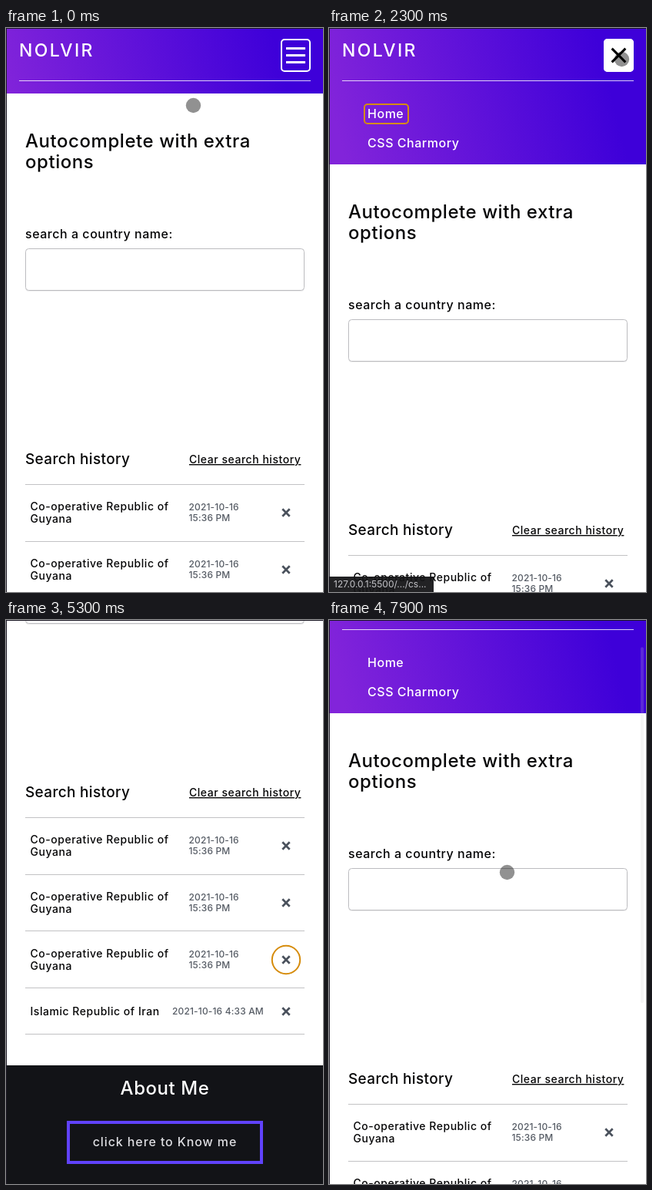
Recreate the animation shown at these times as an HTML page. Size 412x732 px, loop 8000 ms.

```html
<!DOCTYPE html>
<html lang="en">
<head>
<meta charset="utf-8">
<style>
  html, body { margin: 0; height: 100%; overflow: hidden; background: #fff; }
  svg { display: block; width: 412px; height: 732px; }
  text { font: 500 14px Inter, "Open Sans", sans-serif; letter-spacing: .038em; fill: #050506; white-space: pre; }
  .big { font-size: 24px; letter-spacing: .023em; }
  .logo { font-size: 23px; letter-spacing: 2.3px; }
  .mid { font-size: 16px; letter-spacing: .033em; }
  .sub { font-size: 19px; letter-spacing: .017em; }
  .date { font-size: 12px; letter-spacing: .012em; fill: #555b64; }
  .call { font-size: 16px; letter-spacing: .9px; fill: #dedee2; }
  .status { font-size: 12px; font-weight: 400; letter-spacing: 0; fill: #c4c4c8; }
  .link { text-decoration: underline; text-underline-offset: 2px; }
  .light { fill: #fff; }
  .center { text-anchor: middle; }
  .rule { stroke: #c2c2c4; }
  .cross { stroke: #4a515c; stroke-width: 2.7; }
  .focus { fill: none; stroke: #d68c0c; stroke-width: 2; }
</style>
</head>
<body>
<svg viewBox="0 0 412 732">
  <defs>
    <linearGradient id="violet" gradientUnits="userSpaceOnUse" x1="10" y1="130" x2="355" y2="40">
      <stop stop-color="#8224da"/><stop offset="1" stop-color="#3e00d9"/>
    </linearGradient>
  </defs>
  <g id="page">
    <rect id="header" width="412" fill="url(#violet)"/>
    <text class="logo light" x="17" y="37">NOLVIR</text>
    <path d="M17 68.5H396" stroke="#fff" stroke-opacity=".8"/>
    <rect x="358" y="15" width="37" height="41" rx="4" fill="none" stroke="#fff" stroke-width="2"/>
    <rect id="button" x="357" y="14" width="39" height="43" rx="5"/>
    <g id="bars" stroke-width="3"></g>
    <g id="menu">
      <text class="mid light" x="50" y="117">Home</text>
      <text class="mid light" x="50" y="155">CSS Charmory</text>
    </g>
    <g id="main"></g>
  </g>
  <rect id="thumb" x="405" width="4" rx="2" height="462" fill="#ccc" fill-opacity=".2"/>
  <g id="status">
    <rect y="712" width="136" height="20" fill="#151517" fill-opacity=".94"/>
    <text class="status" x="6" y="726">127.0.0.1:5500/.../cs...</text>
  </g>
  <circle id="pointer" r="9.7" fill="#000" fill-opacity=".43"/>
  <path d="M0 .5H412M.5 0V732" stroke="#1d1a26"/>
</svg>
<script>
const $ = id => document.getElementById(id);
const set = (el, attrs) => { for (const k in attrs) el.setAttribute(k, attrs[k]); };
const show = (el, on) => { el.style.display = on ? '' : 'none'; };
const text = (x, y, s, cls = '') => `<text class="${cls}" x="${x}" y="${y}">${s}</text>`;
const rule = y => `<path class="rule" d="M25 ${y}H388"/>`;
const box = (x, y, w, h, r, extra) => `<rect x="${x}" y="${y}" width="${w}" height="${h}" rx="${r}" ${extra}/>`;
const cross = y => `<path class="cross" d="M359.3 ${y - 4.7}l9.4 9.4m0-9.4l-9.4 9.4"/>`;

const MENU = 92, BOTTOM = 428;
const rowY = [629, 703, 777, 844];

let html =
  text(25, 155, 'Autocomplete with extra', 'big') + text(25, 182, 'options', 'big') +
  text(25, 273, 'search a country name:', 'mid') +
  box(25.5, 288, 362, 54, 4, 'fill="#eee"') +
  box(25.5, 286.5, 362, 54, 4, 'fill="#fff" stroke="#bcbcc0"') +
  text(25, 566, 'Search history', 'sub') + text(238, 565, 'Clear search history', 'link') +
  [592.5, 666.5, 739.5, 813.5, 873.5].map(rule).join('');
rowY.forEach((y, i) => {
  html += i < 3
    ? text(31.5, y - 3, 'Co-operative Republic of') + text(31.5, y + 13, 'Guyana') +
      text(237.5, y - 3, '2021-10-16', 'date') + text(237.5, y + 11, '15:36 PM', 'date')
    : text(31.5, y + 5, 'Islamic Republic of Iran') + text(216, y + 4, '2021-10-16 4:33 AM', 'date');
  html += cross(y);
});
html += box(0, 914, 412, 400, 0, 'fill="#121317"') +
  text(206.5, 952, 'About Me', 'big light center') +
  box(81, 988, 251, 52, 0, 'fill="none" stroke="#6042fb" stroke-width="4"') +
  text(206.5, 1019, 'click here to Know me', 'call center');

// Keyboard focus rings, each shown from `from` to `to`
const rings = [];
const ring = (from, to, shape) => {
  rings.push({ from, to });
  return `<g class="ring">${shape}</g>`;
};
const rowRing = (from, to, i) => ring(from, to, `<circle class="focus" cx="364" cy="${rowY[i]}" r="18.2"/>`);
$('menu').innerHTML +=
  ring(2000, 2500, box(46, 99, 57, 25, 4, 'class="focus"')) +
  ring(2500, 3000, box(46, 137, 115, 25, 4, 'class="focus"'));
html +=
  ring(3000, 3700, box(26, 287, 361, 53, 4, 'class="focus"') +
    '<path id="caret" d="M36.5 301V326" stroke="#000"/>') +
  ring(3700, 4300, box(234, 548, 152, 24, 4, 'class="focus"')) +
  rowRing(4300, 4600, 0) + rowRing(4600, 4900, 1) + rowRing(4900, 5500, 2) + rowRing(5500, 6000, 3);
$('main').innerHTML = html;
$('bars').innerHTML = '<path d="M-12.5 0H12.5"/>'.repeat(3);
const ringEls = document.querySelectorAll('.ring');

const within = (t, a, b) => t >= a && t < b;
const clamp = x => Math.min(1, Math.max(0, x));
const mix = (a, b, p) => a + (b - a) * p;
const smooth = p => p * p * (3 - 2 * p);

// Eased path through [time, ...values] points
function along(points, t) {
  let i = 0;
  while (i < points.length - 2 && t >= points[i + 1][0]) i++;
  const [a, b] = [points[i], points[i + 1]];
  const p = smooth(clamp((t - a[0]) / (b[0] - a[0])));
  return a.slice(1).map((v, k) => mix(v, b[k + 1], p));
}
const pointerPath = [
  [0, 243.5, 100.5], [900, 380.5, 40.5], [6700, 380.5, 40.5],
  [7200, 279.5, 137.5], [7300, 279.5, 137.5], [7700, 231.5, 327.5]
];

function scrollAt(t) {
  if (t < 4300) return 0;
  if (t < 4600) return 6;
  const p = clamp((t - 7300) / 600);
  return mix(BOTTOM, 56, 1 - (1 - p) ** 1.7);
}

function draw(t) {
  const open = t >= 1100, scroll = scrollAt(t);
  const fade = clamp((t - 1000) / 260), turn = clamp((t - 1160) / 240);
  const ink = Math.round(255 * (1 - fade * fade));

  set($('page'), { transform: `translate(0 ${-scroll})` });
  set($('header'), { height: open ? 85 + MENU : 85 });
  set($('main'), { transform: `translate(0 ${open ? MENU : 0})` });
  show($('menu'), open);

  show($('button'), fade > 0);
  set($('button'), { fill: `rgb(${[0, 16, 160].map(c => Math.round(mix(c, 255, fade)))})` });
  set($('bars'), { stroke: `rgb(${ink},${ink},${ink})` });
  [...$('bars').children].forEach((bar, i) => set(bar, {
    transform: `translate(376.5 ${35.5 + (i - 1) * 9 * (1 - turn)}) rotate(${(1 - i) * 45 * turn})`,
    opacity: i === 1 ? 1 - turn : 1
  }));

  rings.forEach((r, i) => show(ringEls[i], within(t, r.from, r.to)));
  show($('caret'), t < 3500);
  show($('status'), within(t, 2000, 3300));

  show($('thumb'), t >= 7400);
  set($('thumb'), { y: scroll * 732 / 1160 });

  const [x, y] = along(pointerPath, t);
  show($('pointer'), t < 3400 || t >= 6800);
  set($('pointer'), { cx: x, cy: y });
}

function tick() {
  draw(Math.floor(performance.now() % 8000 / 100) * 100);
  requestAnimationFrame(tick);
}
tick();
</script>
</body>
</html>
```
